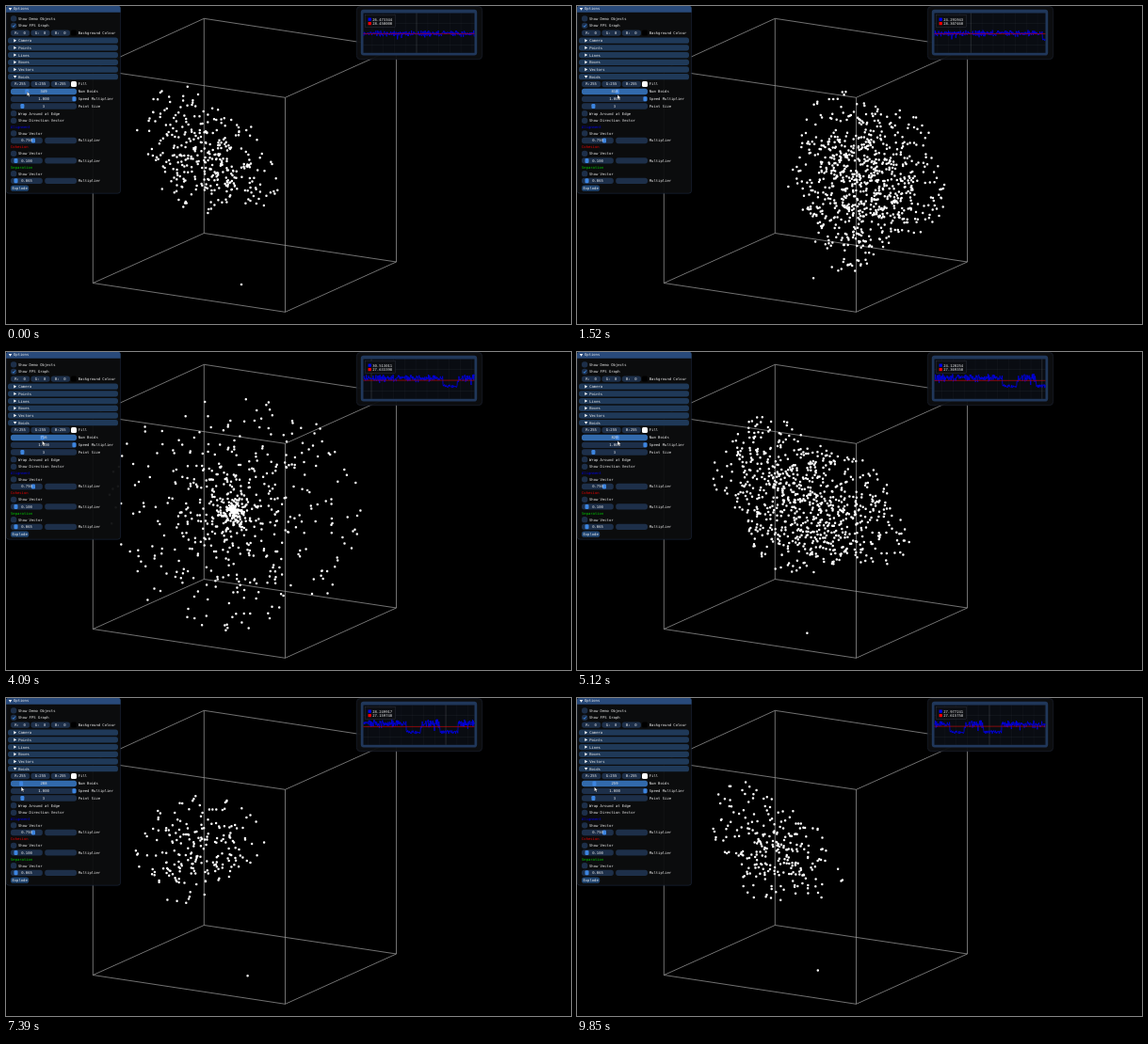
An HTML page that plays this animation: 600 by 338 pixels, repeating every 9880 ms.

```html
<!DOCTYPE html>
<html lang="en">
<head>
<meta charset="utf-8">
<title>Boids</title>
<style>
html, body { margin: 0; width: 100%; height: 100%; overflow: hidden; background: #000; }
svg { display: block; width: 100vw; height: 100vh; }
text { font: 3.86px "DejaVu Sans Mono", monospace; fill: #ececec; white-space: pre; text-rendering: geometricPrecision; }
</style>
</head>
<body>
<svg id="stage" viewBox="0 0 600 338">
  <path d="M210.3 13.3L414.5 44.3V272L296.5 325.3L92.3 294.5V67.3ZM92.3 67.3L296.5 97.3L414.5 44.3M296.5 97.3V325.3M210.3 13.3V241.5L92.3 294.5M210.3 241.5L414.5 272" fill="none" stroke="#979797" stroke-width=".75"/>
  <path id="flock" fill="none" stroke="#fff" stroke-width="2.5" stroke-linecap="round"/>
  <g id="panel"></g>
  <g id="graph">
    <rect x="372.3" y=".5" width="133.4" height="56.2" rx="4" fill="#0d0e10" fill-opacity=".95" stroke="#20283a" stroke-width=".5"/>
    <rect x="376.8" y="3.8" width="123.4" height="48.8" rx="3" fill="#20375a"/>
    <rect x="379.5" y="7.5" width="118" height="42.3" fill="#090c12"/>
    <path d="M379.5 18.5h118M379.5 30h118M379.5 41.5h118" stroke="#5a606a" stroke-opacity=".35" stroke-width=".3"/>
    <path id="minor" stroke="#5a606a" stroke-opacity=".25" stroke-width=".3"/>
    <path id="major" stroke="#8a8f98" stroke-opacity=".6" stroke-width=".4"/>
    <path id="fps" fill="none" stroke="#0000e6" stroke-width=".8" stroke-linejoin="round"/>
    <path id="mean" stroke="#d00000" stroke-width=".6"/>
    <rect x="381.3" y="9.3" width="32" height="13" fill="#0d0f13" fill-opacity=".92" stroke="#3a3d48" stroke-width=".35"/>
    <rect x="384.6" y="12.6" width="3.2" height="3.2" fill="#00f"/>
    <rect x="384.6" y="17" width="3.2" height="3.2" fill="#f00"/>
    <text id="fpsText" x="389.2" y="15.7"/>
    <text id="meanText" x="389.2" y="20.2"/>
  </g>
  <path id="cursor" d="M0 0V4.8L1.2 3.8L2 5.5L2.8 5.1L2 3.4H3.5Z" fill="#fff" stroke="#000" stroke-width=".3"/>
</svg>
<script>
const $ = id => document.getElementById(id);
const LOOP = 9880, TAU = Math.PI * 2;

// ---------- options panel ----------
const FRAME = '#1d2f49', GRAB = '#3d85e0';
const label = (x, y, s, more = '') => `<text x="${x}" y="${y + 1.4}" ${more}>${s}</text>`;
const pill = (x, y, w, fill = FRAME) =>
  `<rect x="${x}" y="${y - 3.15}" width="${w}" height="6.3" rx="2.7" fill="${fill}"/>`;
const grab = (x, y, id = '') =>
  `<rect ${id && `id="${id}"`} x="${x - 2}" y="${y - 2.5}" width="4" height="5" rx="1.2" fill="${GRAB}"/>`;
const mid = (x, y, s, id = '') => label(x, y, s, `text-anchor="middle" ${id && `id="${id}"`}`);
const arrow = (x, y, open) =>
  `<path d="${open ? `M${x - 1.7} ${y - 1.3}h3.4l-1.7 2.8z` : `M${x - 1.3} ${y - 1.7}v3.4l2.8-1.7z`}" fill="#fff"/>`;
const check = (y, s, on) => pill(5, y, 6.3) + label(13, y, s) +
  (on ? `<path d="M6.7 ${y}l1.2 1.4 2-2.8" fill="none" stroke="#4296fa" stroke-width=".8"/>` : '');
const header = (y, s, open) => pill(2, y, 117, '#1f3958') + arrow(9.6, y, open) + label(13.2, y, s);
const rgb = (y, v, name, fill) =>
  ['R', 'G', 'B'].map((c, i) => pill(5 + i * 21.4, y, 20.2) + mid(15.1 + i * 21.4, y, c + ':' + v.padStart(3))).join('') +
  `<rect x="69" y="${y - 3}" width="6" height="6" rx="1.5" fill="${fill}"/>` + label(76.8, y, name);
const slider = (y, s, x, name) => pill(5, y, 70) + grab(x, y) + mid(40, y, s) + label(76.8, y, name);
const rule = (y, name, colour, s, x) => label(5, y, name, `style="fill:${colour}"`) +
  check(y + 7, 'Show Vector') + pill(5, y + 14.6, 33.8) + grab(x, y + 14.6) + mid(22, y + 14.6, s) +
  pill(41.2, y + 14.6, 33.8) + label(76.8, y + 14.6, 'Multiplier');

$('panel').innerHTML =
  '<rect x=".2" y=".2" width="121.4" height="199" rx="3" fill="#0c0d0e" fill-opacity=".95" stroke="#22304a" stroke-width=".5"/>' +
  '<path d="M0 6.8V2Q0 0 2 0H119.6Q121.6 0 121.6 2V6.8Z" fill="#294a7a"/>' +
  arrow(4.5, 3.2, true) + label(8, 3, 'Options') +
  check(13.4, 'Show Demo Objects') + check(20.9, 'Show FPS Graph', true) +
  rgb(28.6, '0', 'Background Colour', '#000') +
  ['Camera', 'Points', 'Lines', 'Boxes', 'Vectors', 'Boids'].map((s, i) => header(36.7 + i * 7.7, s, i === 5)).join('') +
  rgb(83, '255', 'Fill', '#fff') +
  pill(5, 91, 70, '#326aac') + grab(22, 91, 'grab') + mid(40, 91, '', 'count') + label(76.8, 91, 'Num Boids') +
  slider(98.8, '1.000', 72.4, 'Speed Multiplier') + slider(106.5, '3', 17.4, 'Point Size') +
  check(114.2, 'Wrap Around at Edge') + check(121.9, 'Show Direction Vector') +
  rule(128.4, 'Alignment', '#0000e0', '0.750', 29) +
  rule(149.8, 'Cohesion', '#e00000', '0.100', 10.5) +
  rule(171.2, 'Separation', '#00c800', '0.065', 10.5) +
  pill(5, 193.7, 19.2, '#1f4470') + mid(14.6, 193.7, 'Explode');

// ---------- helpers ----------
const clamp = (v, lo, hi) => Math.max(lo, Math.min(hi, v));
const mix = (a, b, u) => a + (b - a) * u;
const ease = u => { u = clamp(u, 0, 1); return u * u * (3 - 2 * u); };
const hash = n => {
  const v = Math.sin(n * 12.9898) * 43758.5453;
  return v - Math.floor(v);
};

// the dragged slider: time and number of boids
const DRAGS = [[0, 349], [.8, 349], [1.3, 818], [2.4, 818], [2.8, 560], [4.09, 716], [4.4, 820], [5.8, 820], [6.12, 511], [6.8, 203], [9.85, 259]];
function count(t) {
  const i = Math.max(1, DRAGS.findIndex(d => d[0] >= t));
  const [a, m] = DRAGS[i - 1], [b, n] = DRAGS[i];
  return Math.round(mix(m, n, ease((t - a) / (b - a))));
}

// ---------- flock ----------
const LOBES = 9;
let seed = 7;
const rnd = () => {
  seed = (seed * 1664525 + 1013904223) % 4294967296;
  return seed / 4294967296;
};
// each boid keeps near one of the lobes spread over a unit disc
const boids = Array.from({ length: 830 }, () => {
  const k = Math.floor(rnd() * LOBES), far = .6 * Math.sqrt((k + .5) / LOBES);
  return {
    lx: far * Math.cos(k * 2.4), ly: far * Math.sin(k * 2.4),
    r: .42 * Math.sqrt(rnd()), a: rnd() * TAU, w: rnd() * 2 - 1,
    q: rnd() ** 1.8, b: rnd() * TAU
  };
});

// the flock swings between the walls, flattens on the right one and is scattered once by a burst
function drawFlock(t, n) {
  const swing = -Math.cos(TAU * t / 2.46), right = Math.max(0, swing);
  const tilt = .3 * Math.cos(TAU * t / 4.92);
  const rx = (66 + n / 16) * (1 - .25 * right);
  const ry = (62 + n / 30) * (1 + .25 * right);
  const cx = clamp(258 + 68 * swing, 122 + rx, 396 - rx), cy = 172 + 16 * swing;
  const burst = Math.exp(-(((t - 4.09) / .32) ** 2));
  let d = `M${(250 + 8 * Math.sin(2 * t)).toFixed(1)} ${(296 + 7 * Math.sin(3 * t)).toFixed(1)}h0`;
  for (const p of boids.slice(0, n - 1)) {
    const u = p.lx + p.r * Math.cos(p.a + p.w * t);
    const v = p.ly + p.r * Math.sin(p.a + p.w * t);
    const x = mix(cx + rx * u, 243 + 140 * p.q * Math.cos(p.b), burst);
    const y = mix(cy + ry * (v + tilt * u), 169 + 128 * p.q * Math.sin(p.b), burst);
    d += `M${x.toFixed(1)} ${y.toFixed(1)}h0`;
  }
  $('flock').setAttribute('d', d);
}

// ---------- frame rate graph ----------
const SPEED = 11.8, LEFT = 379.5, WIDTH = 118;
// many boids slow the program down
function rateAt(i) {
  const noise = hash(i) - .5, rough = hash(Math.floor(i / 9) + 500);
  const spike = hash(i + 999) > .97 ? 2.5 : 0;
  return count(i / 30) > 770 ? 23.7 + noise * 2 : 28.3 + noise * (1.5 + 3.5 * rough) - spike;
}

function drawGraph(t) {
  const now = Math.round(t * 30), mean = 27.8 + .65 * Math.cos(.45 * t), sag = 28.45 - mean;
  let line = '';
  for (let i = now - 299; i <= now; i++) {
    const x = LEFT + WIDTH - SPEED * (now - i) / 30;
    const y = 29.2 - 1.6 * sag - (rateAt(i) - 28.3) * (1.5 + .35 * sag);
    line += `${line ? 'L' : 'M'}${x.toFixed(2)} ${y.toFixed(2)}`;
  }
  $('fps').setAttribute('d', line);
  $('mean').setAttribute('d', `M${LEFT} ${29.4 + .9 * sag}h${WIDTH}`);

  const offset = ((56.5 - SPEED * t) % WIDTH + WIDTH) % WIDTH;
  let minor = '';
  for (let i = 1; i < 10; i++) minor += `M${LEFT + (offset + i * SPEED) % WIDTH} 7.5v42.3`;
  $('minor').setAttribute('d', minor);
  $('major').setAttribute('d', `M${LEFT + offset} 7.5v42.3`);
  $('fpsText').textContent = rateAt(now).toFixed(6);
  $('meanText').textContent = mean.toFixed(6);
}

// ---------- playback ----------
function render(ms) {
  const t = Math.floor(ms % LOOP * .03 + .12) / 30;
  const n = count(Math.min(t, 9.85)), x = 7 + n * .044;
  $('grab').setAttribute('x', x - 2);
  $('count').textContent = n;
  $('cursor').setAttribute('transform', `translate(${x} ${91 + 3.5 * ease((t - .8) / .8)})`);
  drawFlock(t, n);
  drawGraph(t);
}
function tick(now) {
  render(now);
  requestAnimationFrame(tick);
}
render(0);
requestAnimationFrame(tick);
</script>
</body>
</html>
```
